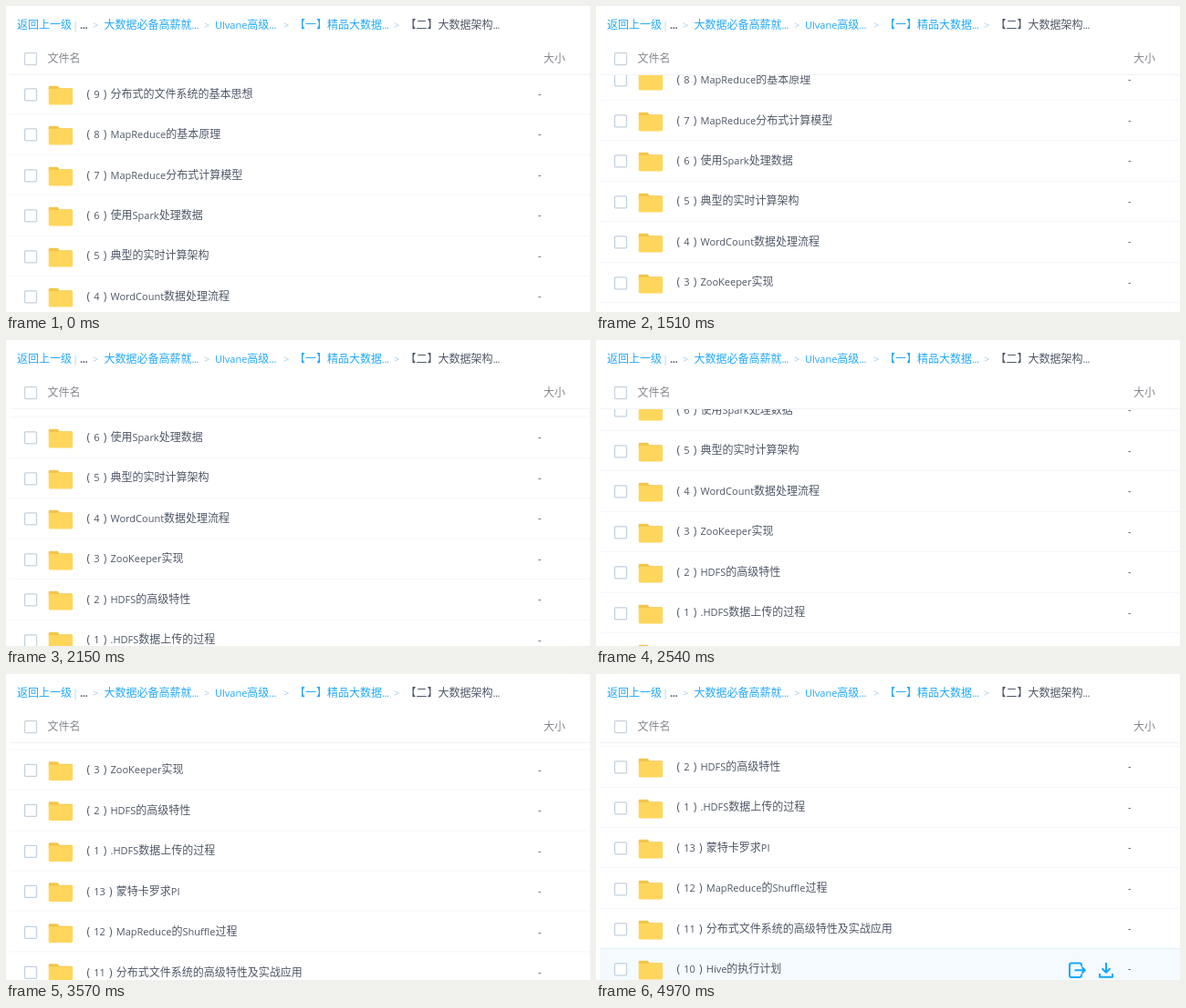
These frames come from a looping animation (640 px wide and 336 px high, 5200 ms). An HTML page:

```html
<!DOCTYPE html>
<html lang="zh-CN">
<head>
<meta charset="utf-8">
<title>文件列表</title>
<style>
  html, body { margin: 0; width: 100%; height: 100%; overflow: hidden; background: #fff; }
  #stage {
    position: relative; width: 640px; height: 336px; overflow: hidden; background: #fff;
    font: 12px/20px "Noto Sans CJK SC", "Noto Sans CJK JP", "Noto Sans CJK", sans-serif;
    color: #4f5767;
  }
  .t { position: absolute; white-space: pre; }
  .t i { font: 11px/0 "Open Sans", "Noto Sans", sans-serif; }
  .t .paren { font-size: 12px; margin: 0 4.2px; }
  .t .dots { letter-spacing: -.4px; }
  .link { color: #22a9f8; }
  .sep { color: #a9cbe4; }
  .bold i { font-weight: 700; }
  .head { color: #83868c; }
  svg { position: absolute; top: 0; left: 0; overflow: visible; }
  #rule { position: absolute; left: 4px; top: 75px; width: 636px; height: 1px; background: #f0f3f7; }
  #view { position: absolute; left: 0; top: 76px; width: 640px; height: 260px; overflow: hidden; }
  #list { position: absolute; left: 0; top: -1px; width: 640px; }
  .row { position: absolute; left: 0; width: 640px; height: 44.45px; }
  .row::before {
    content: ""; position: absolute; left: 4px; right: 0; top: 0; bottom: 0;
    box-sizing: border-box; border-bottom: 1px solid #f4f7fa;
  }
  .row .icons { display: none; }
  .row.on::before { background: #f4fafe; border-bottom-color: #e0f0fa; box-shadow: 0 -1px #e0f0fa; }
  .row.on .icons { display: block; }
</style>
</head>
<body>
<div id="stage">
  <div id="rule"></div>
  <div id="view"><div id="list"></div></div>
</div>
<script>
const LOOP = 5200, PITCH = 44.45;
const stage = document.getElementById("stage");
const list = document.getElementById("list");

const titles = [
  "(9)分布式的文件系统的基本思想", "(8)MapReduce的基本原理", "(7)MapReduce分布式计算模型",
  "(6)使用Spark处理数据", "(5)典型的实时计算架构", "(4)WordCount数据处理流程",
  "(3)ZooKeeper实现", "(2)HDFS的高级特性", "(1).HDFS数据上传的过程",
  "(13)蒙特卡罗求PI", "(12)MapReduce的Shuffle过程",
  "(11)分布式文件系统的高级特性及实战应用", "(10)Hive的执行计划"
];

// Latin runs get their own, slightly smaller face.
const latin = s => s.replace(/[()]|[!-'*-~]+/g, m => {
  const cls = /[()]/.test(m) ? "paren" : m === "..." ? "dots" : "";
  return `<i class="${cls}">${m.replace(">", "&gt;")}</i>`;
});

const text = (x, mid, s, cls = "") =>
  `<span class="t ${cls}" style="left:${x}px;top:${mid - 10.5}px">${latin(s)}</span>`;

const box = (mid, color) =>
  `<rect x="20.5" y="${mid - 6.5}" width="13" height="13" rx="1" fill="#fff" stroke="${color}" stroke-width="1.3"/>`;

const folder = `
  <path d="M46.7 18V14q0-1.3 1.3-1.3h8q1 0 1.5 1l.8 1.5h13.4q1.3 0 1.3 1.3V18z" fill="#f2c54b"/>
  <rect x="46.7" y="16.1" width="26.4" height="17.4" rx="1.4" fill="#ffd65c"/>`;

const icons = `
  <g class="icons" fill="none" stroke="#14a9f8" stroke-width="2" stroke-linejoin="round">
    <path d="M532 19v-1.5q0-2-2-2h-9q-2 0-2 2v11.5q0 2 2 2h9q2 0 2-2v-1.5"/>
    <path d="M524.5 23.3h11M532.3 19.8l3.6 3.5-3.6 3.5"/>
    <path d="M559 15v10.5M554.5 21.3l4.5 4.5 4.5-4.5M552 27v3.8h14V27"/>
  </g>`;

const crumbs = [
  [12, "返回上一级", "link"], [73, "|", "sep"], [81, "...", "bold"], [95, ">", "sep"],
  [107.5, "大数据必备高薪就...", "link"], [217, ">", "sep"],
  [229, "Ulvane高级...", "link"], [304, ">", "sep"],
  [316, "【一】精品大数据...", "link"], [425, ">", "sep"],
  [437.5, "【二】大数据架构..."]
];

stage.insertAdjacentHTML("beforeend",
  crumbs.map(([x, s, cls]) => text(x, 20, s, cls)).join("") +
  `<svg width="40" height="76">${box(58, "#cbd5df")}</svg>` +
  text(45.5, 57.5, "文件名", "head") + text(589, 57.5, "大小", "head"));

list.innerHTML = titles.map((s, i) => `
  <div class="row" style="top:${(i * PITCH).toFixed(2)}px">
    <svg width="640" height="44">${box(22.3, "#c3d1df")}${folder}${icons}</svg>
    ${text(84.3, 21.2, s)}${text(583, 20.5, "-")}
  </div>`).join("");
const rows = [...list.children];

// Scrolling moves in 38 ticks of 80 ms, a few of them 70 ms.
const shortTicks = [3, 17, 31, 36];
const ticks = [1040];
for (let k = 1; k < 38; k++) ticks.push(ticks[k - 1] + (shortTicks.includes(k) ? 70 : 80));

// [tick count, scroll offset]
const path = [[0, 0], [7, 60], [15, 123], [20, 153], [28, 211], [38, 306]];

// [from, to, row]
const hovers = [[180, 340, 4], [4510, 4820, 12], [4970, LOOP, 12]];

function scrollAt(t) {
  const n = ticks.filter(k => k <= t).length;
  const j = Math.max(1, path.findIndex(p => p[0] >= n));
  const [a, ya] = path[j - 1], [b, yb] = path[j];
  return ya + (yb - ya) * (n - a) / (b - a);
}

const start = performance.now();
function draw() {
  const t = (performance.now() - start) % LOOP;
  list.style.transform = `translateY(${-scrollAt(t)}px)`;
  const hover = hovers.find(([from, to]) => t >= from && t < to);
  rows.forEach((row, i) => row.classList.toggle("on", !!hover && hover[2] === i));
  requestAnimationFrame(draw);
}
draw();
</script>
</body>
</html>
```
